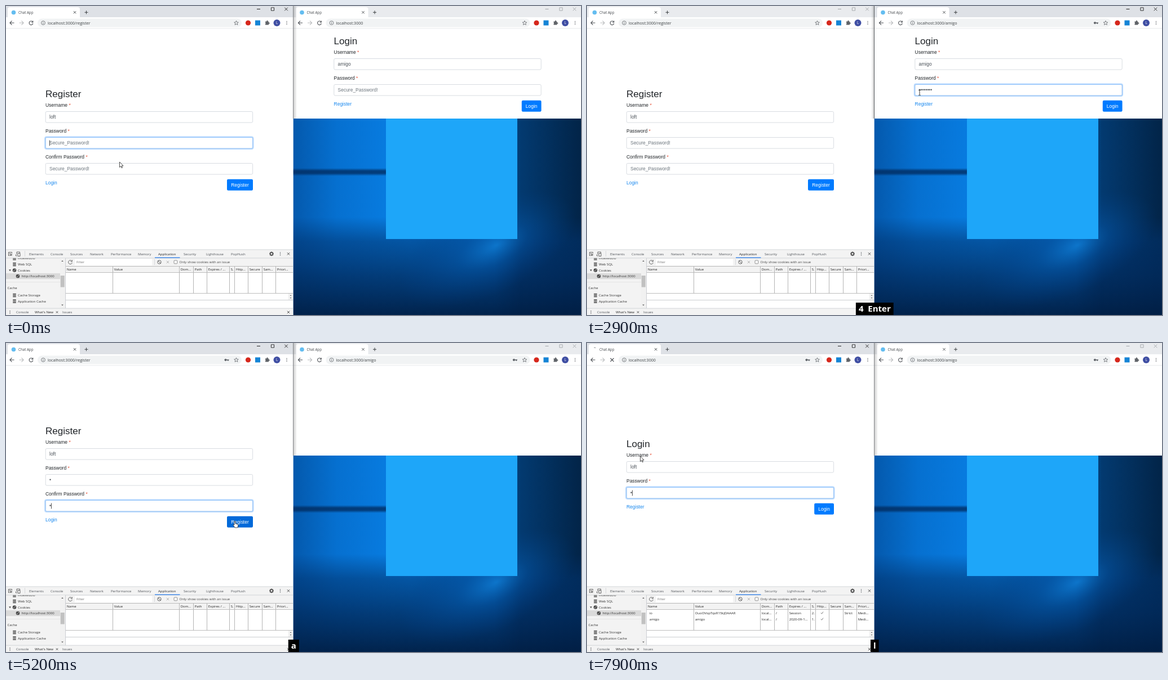
An HTML page with a canvas that plays this animation: 1020x549 px, repeating every 8000 ms.

```html
<!DOCTYPE html>
<html lang="en">
<head>
<meta charset="utf-8">
<title>Chat App</title>
<style>
html, body { margin: 0; width: 100%; height: 100%; overflow: hidden; }
canvas { display: block; }
</style>
</head>
<body>
<canvas id="stage" width="1020" height="549"></canvas>
<script>
const c = document.getElementById('stage').getContext('2d');
const LOOP = 8000, RIGHT = 511.5;
const UI = '"Open Sans", sans-serif', PAGE = '"Liberation Sans", Arial, sans-serif';
const USER = 'loft', HOST_USER = 'amigo';

// [time, x, y] of the pointer's hot spot
const pointerPath = [[0, 201.5, 277], [100, 201.5, 277], [850, 590, 154], [3150, 590, 154],
  [4000, 162, 243], [4300, 162, 243], [4600, 176, 289], [4900, 176, 289], [5180, 406, 317],
  [5750, 406, 317], [6180, 84, 216.5], [6800, 84, 216.5], [7000, 98, 240], [7150, 104, 264],
  [7600, 104, 264], [7800, 94.5, 201]];
const clicks = [900, 4100, 4650, 5450, 6240, 7150];
const overlays = [[0, ''], [1350, 'a'], [1550, 'a  s'], [2050, '1  2'], [2300, '4'],
  [2500, '4  Enter'], [3500, ''], [4450, 'a'], [5680, ''], [6800, 'l']];
const typing = [1250, 1350, 1450, 1550, 1650, 2080, 2200, 2300];
const caretResets = [0, 4100, 4450, 4650, 4900, 6300, 6800, 7000, 7150, 7450];

const clamp = v => Math.max(0, Math.min(1, v));
const between = (t, from, to) => t >= from && t < to;
const lastOf = (list, t, key = v => v) => list.filter(v => key(v) <= t).pop();

let t = 0, mouse = { x: 0, y: 0 }, cursor = 'arrow';

function rect(x, y, w, h, fill) { c.fillStyle = fill; c.fillRect(x, y, w, h); }

function round(x, y, w, h, r, fill, stroke, width = 0.8) {
  c.beginPath();
  c.roundRect(x, y, w, h, r);
  if (fill) { c.fillStyle = fill; c.fill(); }
  if (stroke) { c.strokeStyle = stroke; c.lineWidth = width; c.stroke(); }
}

function dot(x, y, r, fill) {
  c.beginPath();
  c.arc(x, y, r, 0, 7);
  c.fillStyle = fill;
  c.fill();
}

function text(s, x, y, size = 6, color = '#333', family = UI, align = 'left', weight = 400) {
  c.font = `${weight} ${size}px ${family}`;
  c.textAlign = align;
  c.fillStyle = color;
  c.fillText(s, x, y + size * 0.36);
  return c.measureText(s).width;
}

function icon(path, x, y, color = '#5f6368', width = 1, fill) {
  const shape = new Path2D(path);
  c.save();
  c.translate(x, y);
  if (fill) { c.fillStyle = fill; c.fill(shape); }
  c.strokeStyle = color;
  c.lineWidth = width;
  if (width) c.stroke(shape);
  c.restore();
}

function gradient(g, stops) {
  stops.forEach(([at, color]) => g.addColorStop(at, color));
  return g;
}

const ICON = {
  back: 'M4 0H-3.5M0 -3.6L-3.6 0 0 3.6', forward: 'M-4 0H3.5M0 -3.6L3.6 0 0 3.6',
  reload: 'M2.6 -2A3.4 3.4 0 1 0 3.3 1M3.3 -3.8V-1H.6',
  cross: 'M-2.2 -2.2L2.2 2.2M2.2 -2.2L-2.2 2.2', plus: 'M-3 0H3M0 -3V3',
  star: 'M0 -3.8L1.1 -1.2 3.8 -1 1.7 .8 2.4 3.5 0 2 -2.4 3.5 -1.7 .8 -3.8 -1 -1.1 -1.2Z',
  key: 'M-.3 -.7H4V.8H3V2H1.6V.8H-.3A1.9 1.9 0 1 1 -.3 -.7Z',
  puzzle: 'M-3.5 -2H-1A1.2 1.2 0 1 1 1 -2H2.5V0A1.2 1.2 0 1 1 2.5 2V4H-3.5V2A1.2 1.2 0 0 0 -3.5 0Z',
  arrow: 'M0 0V9.6L2.2 7.5 3.7 10.8 5 10.2 3.6 7H6.6Z',
  ibeam: 'M-1.8 -4.5H-.5L0 -4 .5 -4.5H1.8M0 -4V4M-1.8 4.5H-.5L0 4 .5 4.5H1.8',
  hand: 'M-1 0Q0 -1 1 0V4L5 5Q6 5.5 5.8 7L5 11H0L-3 6.5Q-3 5 -1 6.2Z',
  stack: 'M-2.8 -2.4H2.8M-2.8 0H2.8M-2.8 2.4H2.8',
};

function dots(x, y, gap = 2.6) {
  for (const i of [-1, 0, 1]) dot(x, y + i * gap, 0.75, '#5f6368');
}

function wallpaper() {
  c.save();
  c.beginPath();
  c.rect(509.5, 200, 511, 349);
  c.clip();
  const fill = (g, stops) => rect(509, 200, 511, 349, gradient(g, stops));
  fill(c.createLinearGradient(510, 0, 1020, 0), [[0, '#0459ad'], [0.15, '#0670d0'],
    [0.4, '#0880e6'], [0.7, '#0570cc'], [0.79, '#033a70'], [1, '#022448']]);
  rect(509, 288, 165, 14, gradient(c.createLinearGradient(0, 288, 0, 302),
    [[0, 'rgba(1,40,90,0)'], [0.35, 'rgba(1,40,90,.75)'], [0.65, 'rgba(1,40,90,.75)'], [1, 'rgba(1,40,90,0)']]));
  fill(c.createLinearGradient(0, 375, 0, 549), [[0, 'rgba(1,50,108,0)'],
    [0.25, 'rgba(1,50,108,.55)'], [0.6, 'rgba(1,42,92,.78)'], [1, 'rgba(1,30,68,.95)']]);
  c.translate(870, 425);
  c.rotate(-0.45);
  c.scale(1.7, 0.8);
  rect(-160, -160, 320, 320, gradient(c.createRadialGradient(0, 0, 0, -10, 0, 100),
    [[0, 'rgba(20,145,240,.6)'], [0.4, 'rgba(6,100,190,.32)'], [1, 'rgba(3,70,150,0)']]));
  c.restore();
  rect(674, 200, 233, 214, '#1ea6f9');
}

function browser(dx, active, url, hasKey, loading) {
  const ink = active ? '#222' : '#a3a6aa';
  c.save();
  c.translate(dx, 0);
  rect(-1.5, 0, 510.5, 20, active ? '#dee1e6' : '#e9ebee');
  round(3, 2, 128, 20, [4, 4, 0, 0], '#fff');
  if (loading) {
    c.beginPath();
    const a = -1.9 + (t - 7900) / 160;
    c.arc(13.5, 11.5, 3.4, a, a + 0.9);
    c.strokeStyle = '#80868b';
    c.lineWidth = 1;
    c.stroke();
  } else dot(13.5, 11.5, 3.8, '#64bdf0');
  text('Chat App', 22, 11.3, 6.2, '#45494d');
  icon(ICON.cross, 122, 11.3, '#3c4043', 0.9);
  icon(ICON.plus, 142.5, 11.3, '#3c4043', 1);
  icon('M-3 0H3', 448, 5.5, ink);
  icon('M-2.6 -2.6H2.6V2.6H-2.6Z', 473, 5.5, ink, 0.9);
  icon('M-2.8 -2.8L2.8 2.8M2.8 -2.8L-2.8 2.8', 497, 5.5, ink, 0.9);

  rect(-1.5, 20, 510.5, 20, '#fff');
  rect(-1.5, 39.5, 510.5, 0.8, '#e1e3e6');
  icon(ICON.back, 10.5, 30, '#4d5156', 1.1);
  icon(ICON.forward, 27.5, 30, '#babcbe', 1.1);
  icon(loading ? 'M-3 -3L3 3M3 -3L-3 3' : ICON.reload, 44.5, 30, '#4d5156', 1.1);
  round(56, 22.5, 362, 15, 7.5, '#f1f3f4');
  icon('M3.4 0A3.4 3.4 0 1 1 -3.4 0A3.4 3.4 0 1 1 3.4 0M0 -.5V2M0 -2V-1.2', 66, 30, '#5f6368', 0.8);
  text(url, 74, 30, 7.1, '#3c4043');
  if (hasKey) icon(ICON.key, 391.5, 30, '#5f6368', 0, '#5f6368');
  icon(ICON.star, 408.5, 30, '#5f6368', 0.8);
  dot(429.5, 30, 4.6, '#d6271c');
  rect(442, 25.5, 9, 9, '#1484d6');
  icon(ICON.puzzle, 463.5, 29.5, '#5f6368', 0, '#5f6368');
  dot(480.5, 30, 6, '#3f4ea3');
  text('L', 480.5, 30, 6.2, '#fff', UI, 'center');
  dots(498, 30);
  c.restore();
}

function mouseIn(x, y, w, h) {
  return mouse.x >= x && mouse.x <= x + w && mouse.y >= y && mouse.y <= y + h;
}

// fields: [label, value, placeholder, focusFrom, focusTo]
function form(x, y, title, link, fields, showCaret) {
  text(title, x, y - 0.6, 17, '#212529', PAGE);
  fields.forEach(([label, value, placeholder, from, to], i) => {
    const top = y + 31.5 + 46 * i, labelY = y + 20.3 + 46 * i;
    const width = text(label, x, labelY, 8.46, '#212529', PAGE);
    text('*', x + width + 2.4, labelY, 8.46, '#e8553c', PAGE);
    const focus = clamp((t - from) / 150) * (1 - clamp((t - to) / 150));
    if (focus) round(x - 1, top - 1, 369.6, 21.6, 3, null, `rgba(185,218,255,${focus})`, 1.8);
    round(x + 0.2, top, 367.4, 19.6, 2.2, '#fff', '#ced4da');
    if (focus) round(x + 0.2, top, 367.4, 19.6, 2.2, null, `rgba(128,189,255,${focus})`);
    const shown = text(value || placeholder, x + 7, top + 9.8, 8.46, value ? '#495057' : '#6c757d', PAGE);
    const caretOn = (t - lastOf(caretResets, t)) % 1060 < 530;
    if (showCaret && between(t, from, to) && caretOn)
      rect(x + 7 + (value ? shown : 0), top + 5, 0.8, 10, '#222');
    if (mouseIn(x, top, 368, 20)) cursor = 'ibeam';
  });
  const end = y + 46 * fields.length;
  text(link, x, end + 20.3, 8.46, '#1787ee', PAGE);
  const w = title === 'Login' ? 34.8 : 46, left = x + 368 - w;
  const hover = mouseIn(left, end + 14, w, 20);
  if (hover) cursor = 'hand';
  round(left, end + 13.7, w, 20, 2.2, hover ? '#0069d9' : '#007bff');
  text(title, left + w / 2, end + 23.8, 8.46, '#fff', PAGE, 'center');
}

function devtools(hasCookies) {
  const line = '#cacdd1', grey = '#f3f3f3';
  rect(0, 433, 509, 116, grey);
  rect(0, 432.5, 509, 0.8, line);
  rect(0, 447.5, 509, 0.8, line);
  icon('M3 -1V-3H-3V3H-1M-1 -1L3.5 1 1.5 1.6 3 3.5M1.5 1.6L.6 3.4L-1 -1', 7.5, 440.5, '#555', 0.9);
  icon('M-1.5 3.5H-3.5V1M-2 1V-3.5H3.5V-1M0 -1H4V4H0Z', 21, 440.5, '#555', 0.9);
  rect(33, 435, 0.7, 10, line);
  [['Elements', 41], ['Console', 79], ['Sources', 114], ['Network', 149], ['Performance', 186],
    ['Memory', 234], ['Application', 270], ['Security', 315], ['Lighthouse', 355], ['PopHush', 399]]
    .forEach(([s, x]) => text(s, x, 440.5, 6, s === 'Application' ? '#222' : '#50545a'));
  rect(264, 446.5, 44.5, 1.2, '#1a73e8');
  for (let i = 0; i < 8; i++) {
    const a = i * Math.PI / 4;
    dot(471 + 3 * Math.cos(a), 440.3 + 3 * Math.sin(a), 1, '#555');
  }
  c.beginPath();
  c.arc(471, 440.3, 2.3, 0, 7);
  c.lineWidth = 1.6;
  c.strokeStyle = '#555';
  c.stroke();
  dots(486.5, 440.3, 2.4);
  icon(ICON.cross, 501, 440.3, '#555');

  // storage tree
  c.save();
  c.beginPath();
  c.rect(0, 448, 105, 89);
  c.clip();
  rect(0, 474.8, 96, 10.4, '#dadada');
  text('IndexedDB', 21, 448.2);
  for (const y of [448.2, 459, 514, 524.5]) icon(ICON.stack, 15, y, '#555', 1.6);
  text('Web SQL', 21, 459);
  icon('M-2 -1.3H2L0 1.7Z', 7, 469.5, '#555', 0, '#555');
  for (const [x, y] of [[15, 469.5], [21, 480]]) {
    dot(x, y, 3.3, '#4a4a4a');
    dot(x + 1.2, y - 1, 0.7, grey);
    dot(x - 1, y + 1, 0.7, grey);
  }
  text('Cookies', 21, 469.5);
  text('http://localhost:3000', 27.5, 480);
  rect(0, 490, 96, 0.6, '#ddd');
  text('Cache', 2.5, 501);
  text('Cache Storage', 21, 514);
  text('Application Cache', 21, 524.5);
  rect(96, 448, 8.5, 89, '#f1f1f1');
  rect(96.7, 479, 7, 20.5, '#c1c1c1');
  icon('M-1.8 1L0 -1 1.8 1Z', 100, 453, '#555', 0, '#555');
  icon('M-1.8 -1L0 1 1.8 -1Z', 100, 531.5, '#555', 0, '#555');
  c.restore();

  // cookie table
  icon(ICON.reload, 114, 455, '#555', 0.9);
  rect(122, 449.5, 137, 11.5, '#fff');
  text('Filter', 125, 455.3, 6, '#757575');
  icon('M3.2 0A3.2 3.2 0 1 1 -3.2 0A3.2 3.2 0 1 1 3.2 0M-2.2 -2.2L2.2 2.2', 272, 455, '#555', 0.9);
  icon(ICON.cross, 287, 455, '#b4b4b4');
  rect(263, 450, 0.7, 10, line);
  round(298, 452, 5.8, 5.8, 1, '#fff', '#777');
  text('Only show cookies with an issue', 307.5, 455, 6, '#444');
  rect(105, 474, 404, 63, '#fff');
  for (const y of [462, 473, 510]) rect(105, y, 404, 1, '#bdbdbd');
  rect(105, 522, 404, 1, line);
  const columns = [105, 189, 307, 332, 356, 396, 405, 429, 454, 478];
  columns.forEach(x => rect(x, 462, 1, 49, '#b5b5b5'));
  rect(105, 448, 1, 89, line);
  rect(500.5, 511, 8, 11, '#f1f1f1');
  icon('M-1.4 -1.4L0 -3 1.4 -1.4ZM-1.4 1.4L0 3 1.4 1.4Z', 505, 516.5, '#555', 0, '#555');
  const row = (cells, y) => cells.forEach((s, i) =>
    s === '✓' ? icon('M-2 0L-.6 1.7 2 -2', 417, y, '#444', 0.7)
      : text(s, columns[i] + 2.7, y, 6, '#222'));
  row(['Name', 'Value', 'Dom...', 'Path', 'Expires / ...', 'S.', 'Http...', 'Secure', 'Sam...', 'Priori...'], 468);
  if (hasCookies) {
    row(['  io', 'OuoOVopTqxR15kjDAAAR', 'local...', '/', 'Session', '2.', '✓', '', 'Strict', 'Medi...'], 479.5);
    row(['  ' + HOST_USER, HOST_USER, 'local...', '/', '2020-09-1...', '1.', '✓', '', '', 'Medi...'], 490.5);
  }

  // drawer
  rect(0, 536.7, 509, 0.8, line);
  dots(7, 544, 2.3);
  text('Console', 18, 544, 6, '#50545a');
  text("What's New", 51, 544, 6, '#222');
  icon('M-1.7 -1.7L1.7 1.7M1.7 -1.7L-1.7 1.7', 90.5, 544, '#444', 0.9);
  text('Issues', 100, 544, 6, '#50545a');
  icon(ICON.cross, 501, 544, '#555');
}

function leftWindow(active) {
  const loggedOut = t >= 5900;
  rect(0, 0, 509.5, 549, '#fff');
  browser(0, active, 'localhost:3000' + (loggedOut ? '' : '/register'),
    t >= 4450 && !between(t, 6750, 7450), between(t, 5550, 5850) || t >= 7650);
  if (loggedOut) {
    form(70, 179, 'Login', 'Register', [
      ['Username', t < 6800 ? '' : t < 7000 ? 'l' : USER, 'AnyUser', 6300, 7150],
      ['Password', t >= 7450 ? '•' : '', 'Secure_Password!', 7150, 9999]], true);
  } else {
    form(70, 156, 'Register', 'Login', [
      ['Username', USER, '', -2, -1],
      t < 2000 ? ['Password', '', 'Secure_Password!', -999, 930]
        : ['Password', t >= 4450 ? '•' : '', 'Secure_Password!', 4100, 4650],
      ['Confirm Password', t >= 4900 ? '•' : '', 'Secure_Password!', 4650, 9999]], true);
  }
  devtools(loggedOut);
}

function rightWindow(active) {
  rect(510, 0, 510, 200, '#fff');
  browser(RIGHT, active, 'localhost:3000' + (t >= 2700 ? '/' + HOST_USER : ''),
    t >= 1250, between(t, 2550, 2850));
  if (t < 3150) {
    const typed = typing.filter(at => at <= t).length;
    form(581.6, 62, 'Login', 'Register', [
      ['Username', HOST_USER, '', -2, -1],
      ['Password', '•'.repeat(typed), 'Secure_Password!', 950, 9999]], false);
  }
  // the active window casts its shadow on the other one
  const far = active ? 504 : 516;
  rect(Math.min(far, 510), 0, 6, 200, gradient(c.createLinearGradient(far, 0, 510, 0),
    [[0, 'rgba(0,0,0,0)'], [1, 'rgba(0,0,0,.2)']]));
  rect(509, 0, 1, 200, active ? '#55585c' : '#85888c');
}

function keyOverlay() {
  const keys = lastOf(overlays, t, o => o[0])[1];
  if (!keys) return;
  c.font = `700 15px ${UI}`;
  const w = c.measureText(keys).width + 10;
  rect(510.3 - w / 2, 527, w, 22, '#000');
  text(keys, 510.3, 537.6, 15, '#fff', UI, 'center', 700);
}

function movePointer() {
  const i = pointerPath.filter(p => p[0] <= t).length - 1;
  const a = pointerPath[i], b = pointerPath[i + 1] || a;
  const p = b === a ? 0 : (t - a[0]) / (b[0] - a[0]);
  const ease = p * p * (3 - 2 * p);
  mouse = { x: a[1] + (b[1] - a[1]) * ease, y: a[2] + (b[2] - a[2]) * ease };
  cursor = 'arrow';
}

function drawPointer() {
  const since = t - (lastOf(clicks, t) ?? -999);
  if (since < 250) dot(mouse.x, mouse.y, 6, `rgba(250,230,30,${0.85 * (1 - since / 350)})`);
  if (cursor === 'ibeam') icon(ICON.ibeam, mouse.x, mouse.y, '#222', 0.9);
  else icon(ICON[cursor], mouse.x, mouse.y, '#222', 0.8, '#fff');
}

function draw() {
  t = performance.now() % LOOP;
  const rightActive = between(t, 900, 4100);
  movePointer();
  wallpaper();
  leftWindow(!rightActive);
  rightWindow(rightActive);
  keyOverlay();
  drawPointer();
  requestAnimationFrame(draw);
}
draw();
</script>
</body>
</html>
```
